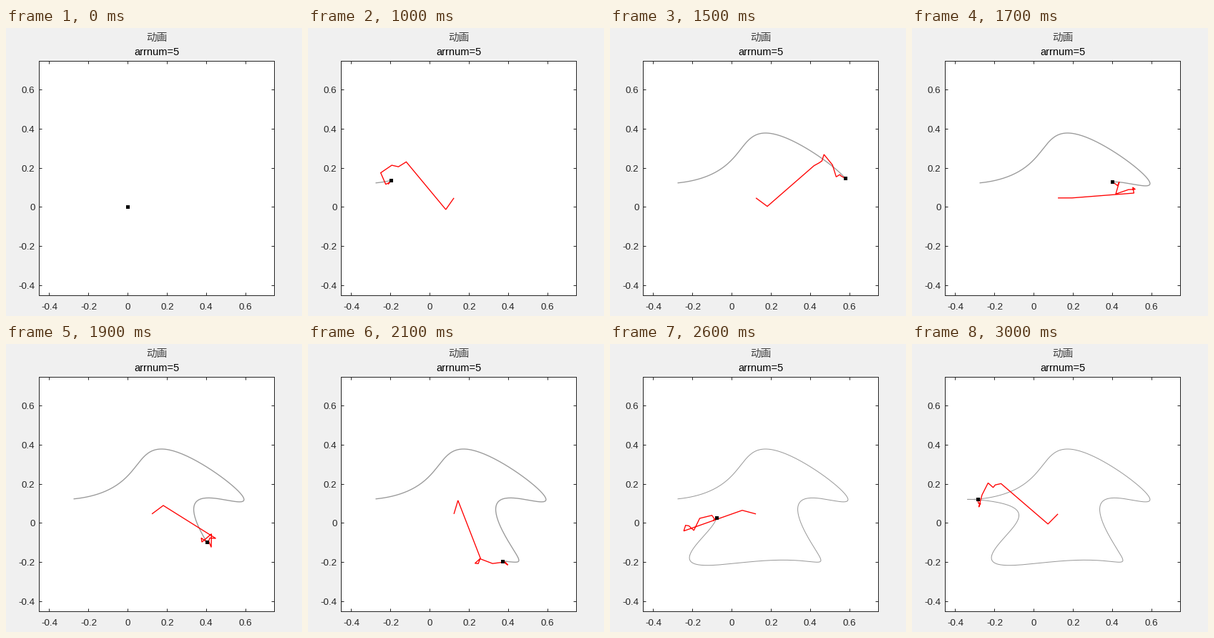
Write a matplotlib script that moves like this. It is 414x403 px and loops after 3400 ms.

```python
import numpy as np
import matplotlib.pyplot as plt
from matplotlib.animation import FuncAnimation

W, H, DPI = 414, 403, 64
LEFT, TOP, RIGHT, BOTTOM = 46.4, 46.4, 375.4, 374.4
XLIM, YLIM = (-0.4512, 0.7488), (-0.4537, 0.7463)
FRAME_MS, FRAMES, HOLD = 100, 34, 10

# A chain of rotating arms: length and angle (deg) of turn rates 1, -1, 2, -2, ...
HUB = 0.1240 + 0.0460j
ARMS = [(0.0723, 235), (0.3165, 129.6), (0.0303, 212), (0.0168, 212),
        (0.0347, 167), (0.0686, 214.4), (0.0642, -66.5), (0.0212, 26),
        (0.0106, 233), (0.0230, 54)]
RATES = np.array([s * n for n in range(1, 6) for s in (1, -1)])
COEF = np.array([r * np.exp(1j * np.radians(a)) for r, a in ARMS])

# Phases in degrees: the trace begins before the first pose.
START, END, STEP, LAG = -8.3, 350.4, 18.33, 3.2
INK = "#262626"


def pt(px):
    return px * 72 / DPI


def joints(phase):
    """Joints from hub to pen, one row per phase."""
    turn = np.exp(1j * np.outer(np.radians(phase), RATES))
    links = turn * COEF
    hub = np.full((len(links), 1), HUB)
    return np.cumsum(np.hstack([hub, links]), axis=1)


fig = plt.figure(figsize=(W / DPI, H / DPI), dpi=DPI, facecolor="#f0f0f0")
ax = fig.add_axes([LEFT / W, 1 - BOTTOM / H, (RIGHT - LEFT) / W, (BOTTOM - TOP) / H])
ax.set(xlim=XLIM, ylim=YLIM)
ticks = np.arange(-2, 4) * 0.2
ax.set_xticks(ticks)
ax.set_yticks(ticks)
ax.tick_params(direction="in", length=pt(4), width=pt(1), color=INK, top=True,
               right=True, labelbottom=False, labelleft=False)
for spine in ax.spines.values():
    spine.set(linewidth=pt(1), edgecolor=INK)


def label(x, y, text, size, color, ha="center", font="Liberation Sans"):
    fig.text(x / W, 1 - y / H, text, fontsize=pt(size), color=color,
             ha=ha, va="baseline", family=font)


for v in ticks:
    name = f"{v:.1f}" if abs(v) > 0.01 else "0"
    x = LEFT + (v - XLIM[0]) * (RIGHT - LEFT) / 1.2
    y = BOTTOM - (v - YLIM[0]) * (BOTTOM - TOP) / 1.2
    label(x + 0.4, 394.5, name, 13.33, INK)
    label(40.5, y + 5.1, name, 13.33, INK, ha="right")
label(211, 17.6, "动画", 14.67, "#404040", font="Noto Sans CJK JP")
label(211, 38.5, "arrnum=5", 14.67, "black")

trace, = ax.plot([], [], color="#999999", solid_capstyle="butt")
arms, = ax.plot([], [], color="red", lw=pt(1.33), solid_capstyle="butt",
                solid_joinstyle="miter")
pen, = ax.plot([], [], "s", color="black", ms=pt(5), mew=0)


def draw(frame):
    step = frame - HOLD
    if step < 0:
        trace.set_data([], [])
        arms.set_data([], [])
        pen.set_data([0], [0])
    else:
        phase = np.clip(STEP * step - LAG, 0, END)
        poses = joints(np.linspace(START, phase, 12 + int(phase)))
        line, chain = poses[:, -1], poses[-1]
        trace.set_data(line.real, line.imag)
        trace.set_linewidth(pt(1.33 if phase < 265 else 1))
        arms.set_data(chain.real, chain.imag)
        pen.set_data([chain[-1].real], [chain[-1].imag])
    return trace, arms, pen


anim = FuncAnimation(fig, draw, frames=FRAMES, interval=FRAME_MS,
                     init_func=lambda: draw(0), repeat=True, repeat_delay=0)
plt.show()
```
